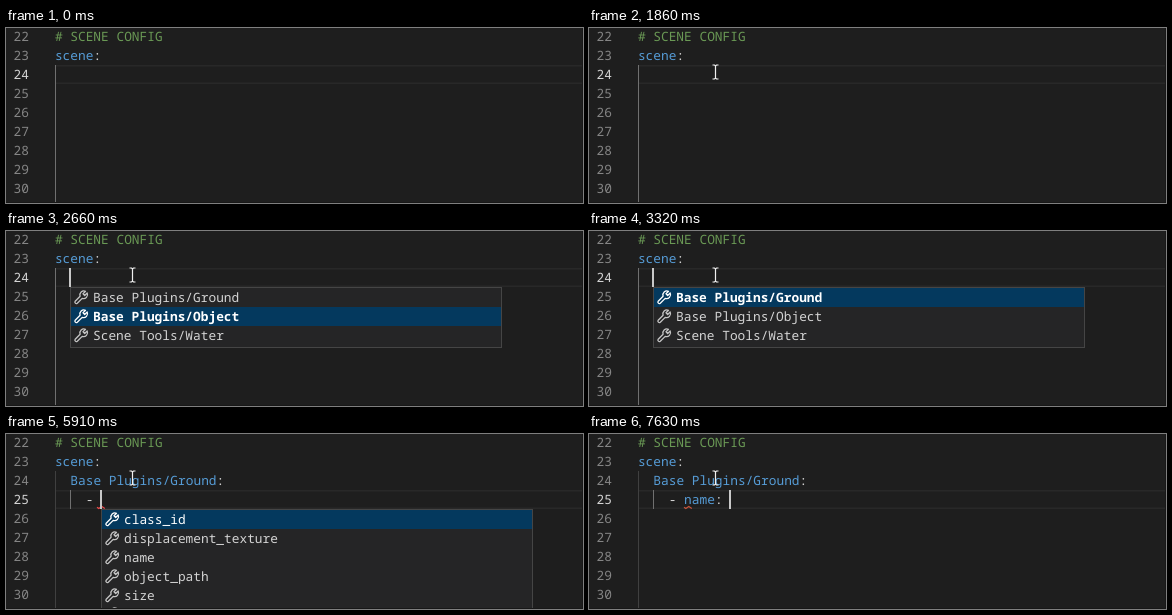
An HTML page that plays this animation: 577x175 px, repeating every 8000 ms.

```html
<!DOCTYPE html>
<html lang="en">
<head>
<meta charset="utf-8">
<title>Scene config editor</title>
<style>
  html, body { margin: 0; width: 100%; height: 100%; overflow: hidden; background: #1e1e1e; }
  svg { display: block; width: 577px; height: 175px; }
  text {
    font: 12.83px "Noto Sans Mono", "DejaVu Sans Mono", monospace;
    text-rendering: geometricPrecision;
    white-space: pre;
    fill: #d4d4d4;
  }
  .num { fill: #858585; }
  .num.active { fill: #d4d4d4; font-weight: 500; }
  .comment { fill: #6a9955; }
  .key { fill: #569cd6; }
  .icon { fill: none; stroke: #c5c5c5; stroke-width: 1.3; stroke-linejoin: round; }
  .row.selected .bar { fill: #04395e; }
  .row.selected text { fill: #fff; }
  .row.selected .icon { stroke: #fff; }
  .row.selected.strong text { font-weight: 700; }
  .bar { fill: none; }
  .hidden { display: none; }
</style>
</head>
<body>
<svg id="stage" viewBox="0 0 577 175"></svg>
<script>
const LOOP = 8000, LINE = 19, CHAR = 7.7, LEFT = 48.9;
const WRENCH = 'M9.2 8.9L4.3 13.8a1.5 1.5 0 0 1-2.1-2.1L7.1 6.8A4 4 0 0 1 12.5 1.8L10 4.3L11.7 6L14.2 3.5A4 4 0 0 1 9.2 8.9Z';
const stage = document.getElementById('stage');

function add(parent, tag, attrs = {}, text) {
  const el = document.createElementNS('http://www.w3.org/2000/svg', tag);
  for (const name in attrs) el.setAttribute(name, attrs[name]);
  if (text !== undefined) el.textContent = text;
  parent.append(el);
  return el;
}
const group = (parent = stage, cls = '') => add(parent, 'g', { class: cls });
const rect = (parent, x, y, width, height, fill) =>
  add(parent, 'rect', { x, y, width, height, fill });
const show = (el, on) => el.classList.toggle('hidden', !on);
const lineTop = n => (n - 22) * LINE - 1;

// parts: [class, text] runs placed on one editor line
function code(parent, line, col, ...parts) {
  for (const [cls, str] of parts) {
    add(parent, 'text', { x: LEFT + col * CHAR, y: lineTop(line) + 14, class: cls }, str);
    col += str.length;
  }
}

function menu(x, y, height, items) {
  const el = group();
  add(el, 'rect', { x: x + .5, y: y + .5, width: 431, height, fill: '#252526', stroke: '#454545' });
  const rows = items.map((label, i) => {
    const top = y + 1 + i * LINE, row = group(el, 'row');
    add(row, 'rect', { x: x + 1, y: top, width: 430, height: LINE, class: 'bar' });
    add(row, 'path', { d: WRENCH, class: 'icon', transform: `translate(${x + 3} ${top + 1.5})` });
    add(row, 'text', { x: x + 23, y: top + 14 }, label);
    return row;
  });
  return { el, rows };
}

function wave(x, color) {
  return add(stage, 'polyline', {
    points: `${x},73.3 ${x + 1.8},74.5 ${x + 4.8},72.5 ${x + 7.8},74.5`,
    fill: 'none', stroke: color, 'stroke-width': 1.1
  });
}

const current = group();
rect(current, 49, 37, 528, 1.5, '#282828');
rect(current, 49, 54.5, 528, 1.5, '#282828');

const numbers = [];
for (let n = 22; n <= 30; n++)
  numbers[n] = add(stage, 'text', { x: 7.6, y: lineTop(n) + 14, class: 'num' }, n);

const outer = rect(stage, 49, 37, 1, 138, '#707070');
const inner = rect(stage, 64, 56, 1, 19, '#707070');

code(stage, 22, 0, ['comment', '# SCENE CONFIG']);
code(stage, 23, 0, ['key', 'scene'], ['', ':']);
const entry = group();
code(entry, 24, 2, ['key', 'Base Plugins/Ground'], ['', ':']);
code(entry, 25, 4, ['', '-']);
const prop = group();
code(prop, 25, 6, ['key', 'name'], ['', ':']);

const waves = [wave(91, '#f14c4c'), wave(95, '#c8553d')];
const menus = [
  menu(64, 56, 60, ['Base Plugins/Ground', 'Base Plugins/Object', 'Scene Tools/Water']),
  menu(95, 75, 120, ['class_id', 'displacement_texture', 'name', 'object_path', 'size', ''])
];
const caret = rect(stage, 0, 0, 2, LINE, '#c8c8c8');
const mouse = add(stage, 'path', {
  d: 'M-3-7h2l1 1l1-1h2M0-6V6M-3 7h2l1-1l1 1h2',
  fill: 'none', stroke: '#f0f0f0', 'stroke-width': 1.2
});
rect(stage, 576, 0, 1, 175, '#171717');
rect(stage, 0, 174, 577, 1, '#171717');

// Each step changes only the listed fields
const steps = [
  [0, { line: 24, caret: 49, on: 0, menu: -1, sel: 0, strong: 0, wave: -1, entry: 0, prop: 0 }],
  [800, { on: 1 }],
  [1330, { caret: 63 }],
  [1860, { on: 0 }],
  [1930, { menu: 0 }],
  [2320, { on: 1 }],
  [2660, { sel: 1, strong: 1 }],
  [2860, { on: 0 }],
  [2920, { sel: 0 }],
  [3320, { on: 1 }],
  [3850, { on: 0 }],
  [3920, { on: 1, menu: -1, strong: 0, entry: 1, line: 25, caret: 94 }],
  [4120, { wave: 0 }],
  [4380, { on: 0 }],
  [4910, { on: 1 }],
  [5370, { on: 0 }],
  [5570, { menu: 1 }],
  [5910, { on: 1 }],
  [6240, { sel: 1, strong: 1 }],
  [6370, { sel: 2 }],
  [6440, { on: 0 }],
  [6640, { on: 1, menu: -1, wave: -1, prop: 1, caret: 140 }],
  [6840, { wave: 1 }],
  [7110, { on: 0 }],
  [7630, { on: 1 }]
];

function pointer(t) {
  if (t < 800) {
    const k = Math.min(6, Math.floor((t - 130) / 66.6));
    const p = 1 - (1 - k / 6) ** 2;
    return [344 - 217.5 * p, 144 - 107 * p];
  }
  const nudge = [[130.5, 37], [132, 39], [129.5, 42], [126.5, 44]];
  return nudge[Math.min(3, Math.floor((t - 800) / 63.3))];
}

function draw(t) {
  const s = {};
  for (const [at, change] of steps) if (at <= t) Object.assign(s, change);

  const top = lineTop(s.line);
  current.setAttribute('transform', `translate(0 ${top - 37})`);
  numbers.forEach((el, n) => el.classList.toggle('active', n === s.line));
  outer.setAttribute('fill', s.entry ? '#404040' : '#707070');
  show(inner, s.entry);
  show(entry, s.entry);
  show(prop, s.prop);
  waves.forEach((el, i) => show(el, i === s.wave));
  menus.forEach(({ el, rows }, i) => {
    show(el, i === s.menu);
    rows.forEach((row, j) => {
      row.classList.toggle('selected', j === s.sel);
      row.classList.toggle('strong', !!s.strong);
    });
  });
  caret.setAttribute('x', s.caret);
  caret.setAttribute('y', top);
  show(caret, s.on);
  show(mouse, t >= 130);
  if (t >= 130) mouse.setAttribute('transform', `translate(${pointer(t)})`);
}

const start = performance.now();
function tick() {
  draw((performance.now() - start) % LOOP);
  requestAnimationFrame(tick);
}
tick();
</script>
</body>
</html>
```
